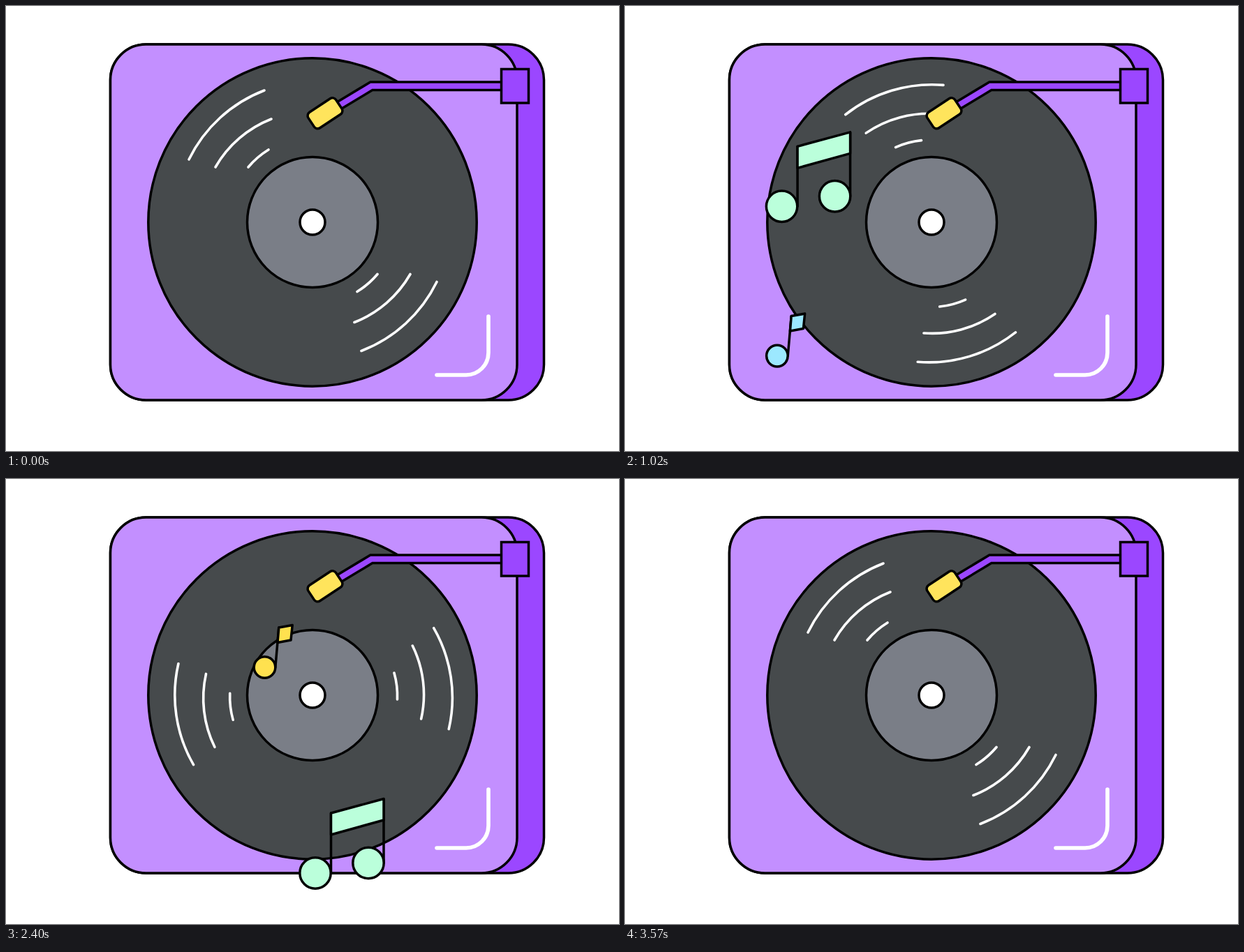
These frames come from a looping animation (878 px wide and 638 px high, 3.6 s). An HTML page:

```html
<!DOCTYPE html>
<html lang="en">
<head>
<meta charset="utf-8">
<title>Turntable</title>
<style>
  html, body { margin: 0; width: 100%; height: 100%; overflow: hidden; background: #fff; }
  svg { display: block; width: 878px; height: 638px; }
  .ink { stroke: #000; stroke-width: 3.5; stroke-linejoin: round; stroke-linecap: round; }
  .shine { fill: none; stroke: #fff; stroke-width: 3.6; stroke-linecap: round; }
</style>
</head>
<body>
<svg viewBox="0 0 878 638">
  <defs>
    <g id="grooves">
      <path d="M262 220A200 200 0 0 1 370 121"/>
      <path d="M300 231A159 159 0 0 1 380 162"/>
      <path d="M347 231A121 121 0 0 1 376 206"/>
    </g>
    <g id="single" class="ink">
      <path fill="none" d="M15.3 0L20.3 -57"/>
      <path d="M20.3 -57L39.7 -60.5L37.5 -39L18.5 -35.5Z"/>
      <circle r="15.3"/>
    </g>
    <g id="double" class="ink">
      <path fill="none" d="M22.5 0V-86M98 -14.5V-106"/>
      <path d="M22.5 -86L98 -106.5V-76L22.5 -55Z"/>
      <circle r="22.2"/>
      <circle cx="76" cy="-14.5" r="22.2"/>
    </g>
  </defs>

  <g class="ink">
    <rect x="149.5" y="55" width="621" height="510" rx="51" fill="#9b47ff"/>
    <rect x="149.5" y="55" width="582.5" height="510" rx="51" fill="#c38fff"/>
  </g>
  <path class="shine" style="stroke-width:5.6" d="M691 445V497A32 32 0 0 1 659 529H617"/>

  <g class="ink">
    <circle cx="439" cy="310" r="235.2" fill="#464a4c"/>
    <circle cx="439" cy="310" r="93.5" fill="#7a7e87"/>
    <circle cx="439" cy="310" r="18" fill="#fff"/>
  </g>
  <g id="record" class="shine">
    <use href="#grooves"/>
    <use href="#grooves" transform="rotate(180 439.5 307.75)"/>
  </g>

  <g id="notes"></g>

  <g fill="none">
    <path d="M712 114.7H523.5L478 142.2" stroke="#000" stroke-width="15"/>
    <path d="M712 114.7H523.5L478 142.2" stroke="#9b47ff" stroke-width="8"/>
  </g>
  <g class="ink">
    <rect x="-23.7" y="-13.5" width="47.4" height="27" rx="6" fill="#ffe45c" transform="translate(457 153.8) rotate(-33.5)"/>
    <rect x="709.5" y="90.5" width="39" height="48.5" fill="#9b47ff" style="stroke-linejoin:miter"/>
  </g>
</svg>
<script>
const FRAME = 30, FRAMES = 120, LIFE = 1680, FADE = 240;

// Drift shared by all notes: [age in ms, dx, dy]
const drift = [
  [0, 17, -20], [200, 0, 0], [540, -42.5, 21], [880, -96, 23],
  [1235, -149.5, 38], [1390, -169.5, 49], [1640, -187, 73], [1680, -189, 77]
];

const notes = [
  { shape: 'single', color: '#9ce8ff', x: 327, y: 476, start: 55 },
  { shape: 'double', color: '#bbffdb', x: 268.5, y: 266, start: 470 },
  { shape: 'single', color: '#ffe14f', x: 520, y: 232, start: 1165 },
  { shape: 'double', color: '#bbffdb', x: 485.5, y: 544, start: 1860 }
];

const record = document.getElementById('record');
const layer = document.getElementById('notes');
for (const note of notes) {
  note.el = document.createElementNS('http://www.w3.org/2000/svg', 'use');
  note.el.setAttribute('href', '#' + note.shape);
  note.el.setAttribute('fill', note.color);
  layer.append(note.el);
}

function slope(i, axis) {
  const a = drift[Math.max(i - 1, 0)];
  const b = drift[Math.min(i + 1, drift.length - 1)];
  return (b[axis] - a[axis]) / (b[0] - a[0]);
}

// Cubic Hermite interpolation along the drift
function driftAt(age, axis) {
  let i = 0;
  while (i < drift.length - 2 && age > drift[i + 1][0]) i++;
  const [a, b] = [drift[i], drift[i + 1]];
  const span = b[0] - a[0], u = (age - a[0]) / span, v = 1 - u;
  return v * v * (1 + 2 * u) * a[axis] + u * u * (3 - 2 * u) * b[axis]
    + span * u * v * (v * slope(i, axis) - u * slope(i + 1, axis));
}

function draw(now) {
  const frame = Math.floor(now / FRAME) % FRAMES;
  record.setAttribute('transform', `rotate(${720 * frame / (FRAMES - 1)} 439 310)`);
  for (const { el, x, y, start } of notes) {
    const age = frame * FRAME - start;
    const alive = age > 0 && age < LIFE;
    el.setAttribute('opacity', alive ? Math.min(1, age / FADE, (LIFE - age) / FADE) : 0);
    if (alive) el.setAttribute('transform', `translate(${x + driftAt(age, 1)} ${y + driftAt(age, 2)})`);
  }
}

let origin;
function tick(now) {
  origin ??= now;
  draw(now - origin);
  requestAnimationFrame(tick);
}
draw(0);
requestAnimationFrame(tick);
</script>
</body>
</html>
```
